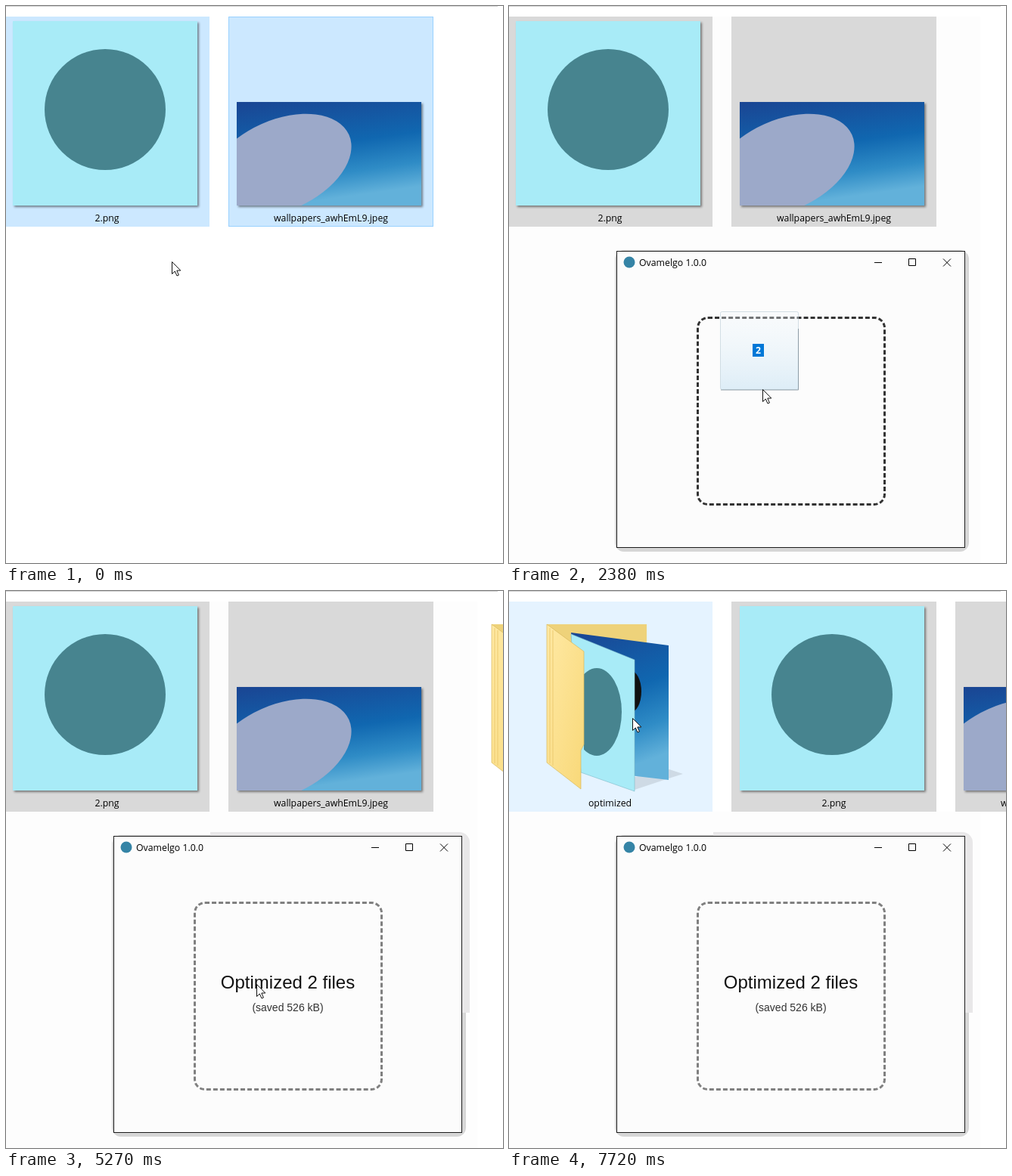
An HTML page that plays this animation: 657 by 737 pixels, repeating every 8000 ms.

```html
<!DOCTYPE html>
<html lang="en">
<head>
<meta charset="utf-8">
<title>Drop to optimize</title>
<style>
  html, body { margin: 0; width: 100%; height: 100%; overflow: hidden; background: #fff; }
  svg { display: block; }
  text { font: 12.3px "Open Sans", "Noto Sans", sans-serif; }
  .label { text-anchor: middle; }
  .result { font-family: "Liberation Sans", Arial, sans-serif; text-anchor: middle; }
  .thumb { filter: drop-shadow(2px 2px 1.5px rgba(0, 0, 0, .45)); }
  #drop { box-sizing: border-box; width: 250px; height: 250px; border: 3px dashed #808080; border-radius: 15px; }
  #drop.hover { border-color: #333; }
</style>
</head>
<body>
<svg width="657" height="737" viewBox="0 0 657 737">
  <defs>
    <linearGradient id="sky" x2=".25" y2="1">
      <stop stop-color="#1a4593"/><stop offset=".5" stop-color="#1067b0"/>
      <stop offset=".78" stop-color="#2f8cc6"/><stop offset="1" stop-color="#62b1da"/>
    </linearGradient>
    <linearGradient id="flap" x2="1" y2="1">
      <stop stop-color="#ffe9a4"/><stop offset="1" stop-color="#f8d878"/>
    </linearGradient>
    <linearGradient id="glass" x2="0" y2="1">
      <stop stop-color="#f2f8fc" stop-opacity=".3"/><stop offset="1" stop-color="#d3e8f5" stop-opacity=".75"/>
    </linearGradient>
    <clipPath id="photoClip"><rect x="11" y="127" width="244" height="137"/></clipPath>
    <clipPath id="pageClip"><path d="M99 64L166 91V265L99 241Z"/></clipPath>
    <clipPath id="corner"><rect x="270" y="310" width="350" height="248"/></clipPath>
  </defs>

  <rect id="tint" width="623" fill="#fdfdfd"/>
  <path d="M0 .5H650" stroke="#d4d4d4"/>

  <g id="png">
    <rect class="tile" y="14" width="271" height="278"/>
    <g class="thumb">
      <rect x="11" y="20" width="244" height="244" fill="#a8ebf7"/>
      <circle cx="133" cy="137" r="80" fill="#47848f"/>
    </g>
    <text class="label" x="135.5" y="285">2.png</text>
  </g>

  <g id="jpeg">
    <rect class="tile" id="focusTile" x=".5" y="14.5" width="270" height="277"/>
    <g class="thumb">
      <g clip-path="url(#photoClip)">
        <rect x="11" y="127" width="244" height="137" fill="url(#sky)"/>
        <ellipse cx="68" cy="211" rx="100" ry="60" transform="rotate(-24 68 211)" fill="#9ca9c9"/>
      </g>
    </g>
    <text class="label" x="135.5" y="285">wallpapers_awhEmL9.jpeg</text>
  </g>

  <g id="folder">
    <rect id="folderHover" y="14" width="271" height="278" fill="#e5f3ff"/>
    <g transform="translate(2)">
      <path d="M50 44H182V228H95Z" fill="#eed27a"/>
      <g id="contents">
        <path d="M166 246L212 236L230 242L205 250L166 263Z" fill="#000" opacity=".1"/>
        <path d="M82 55L211 72V250L100 237Z" fill="url(#sky)"/>
        <ellipse cx="160" cy="133" rx="15" ry="28" fill="#111"/>
        <path d="M82 57L166 91V265L95 240Z" fill="#a8ebf7" stroke="#7fb9c8" stroke-width=".6"/>
        <ellipse cx="116" cy="160" rx="33" ry="58" fill="#47848f" clip-path="url(#pageClip)"/>
      </g>
      <path d="M50 44L99 80V203L95 211V262L50 227Z" fill="url(#flap)" stroke="#d9b85c" stroke-width=".7"/>
      <path d="M54 49V228M58 52V231" stroke="#ecca70" fill="none"/>
    </g>
    <text class="label" x="135.5" y="285">optimized</text>
  </g>

  <g id="app">
    <rect id="shadow" rx="12"/>
    <rect id="cornerShadow" x="136" y="319" width="477" height="409" rx="14" fill="#e8e7e8" clip-path="url(#corner)"/>
    <rect id="frame" x="142.5" y="324.5" width="460" height="392" fill="#fcfcfc"/>
    <circle cx="159" cy="339" r="7.5" fill="#3584a6"/>
    <text id="title" x="172" y="344">Ovamelgo 1.0.0</text>
    <path id="buttons" d="M483 339.5H493M528.5 334.5H537.5V343.5H528.5ZM574 334.5L584 344.5M584 334.5L574 344.5" fill="none"/>
    <foreignObject x="248" y="411" width="250" height="250"><div id="drop"></div></foreignObject>
    <g id="spinner" transform="translate(372 535.5)"></g>
    <g id="result">
      <text class="result" x="372.5" y="526" style="font-size:24px" fill="#111">Optimized 2 files</text>
      <text class="result" x="372.5" y="556" style="font-size:14px" fill="#333">(saved 526 kB)</text>
    </g>
  </g>

  <g id="pointer">
    <g id="ghost">
      <rect x="-55.5" y="-102.5" width="103" height="103" rx="2" fill="url(#glass)" stroke="#b9cbd6" stroke-opacity=".6"/>
      <path d="M-55 1H47.5V-80" fill="none" stroke="#6f818d" stroke-opacity=".7"/>
      <rect x="-13" y="-60" width="15" height="17" fill="#0078d7"/>
      <text class="label" x="-5.5" y="-47" fill="#fff" style="font-weight:bold">2</text>
    </g>
    <path d="M.5 .5V16.5L4.3 13L7 19L9.4 18L6.8 12H11.8Z" fill="#fff" stroke="#111"/>
  </g>
</svg>

<script>
const LOOP = 8000;
const $ = id => document.getElementById(id);
const show = (id, visible) => { $(id).style.display = visible ? '' : 'none'; };
const set = (id, attrs) => { for (const k in attrs) $(id).setAttribute(k, attrs[k]); };

// Pointer positions [time, x, y]; each holds until the next. No position: out of view.
const pointerPath = [
  [0, 219, 338], [120, 205, 450], [265, 171, 659], [410],
  [1110, 130, 690], [1250, 112, 560], [1390, 116, 420], [1530, 165, 265],
  [1670, 230, 235], [1810, 289, 296], [1960, 326, 375], [2100, 345, 440],
  [2240, 350, 490], [2380, 335, 507], [2930, 330, 520], [5000, 331, 520],
  [6960, 322, 490], [7087, 295, 425], [7213, 255, 345], [7340, 220, 280],
  [7467, 192, 225], [7593, 172, 185], [7720, 163, 168]
];

const BARS = 12;
const bars = Array.from({ length: BARS }, (_, i) => {
  const bar = document.createElementNS('http://www.w3.org/2000/svg', 'rect');
  const attrs = { x: 10, y: -2.5, width: 12, height: 5, rx: 2, transform: `rotate(${i * 360 / BARS})` };
  for (const k in attrs) bar.setAttribute(k, attrs[k]);
  return $('spinner').appendChild(bar);
});

function placeTile(id, column) {
  set(id, { transform: `translate(${296 * column - 2})` });
}

function drawFiles(t) {
  const sorted = t >= 5550;
  placeTile('png', sorted ? 1 : 0);
  placeTile('jpeg', sorted ? 2 : 1);
  placeTile('folder', sorted ? 0 : 2);
  show('folder', t >= 5270);
  show('contents', t >= 6140);
  show('folderHover', t >= 7340);
  const selected = t < 810;
  for (const tile of document.querySelectorAll('.tile')) {
    tile.setAttribute('fill', selected ? '#cce8ff' : '#d9d9d9');
  }
  set('focusTile', { stroke: selected ? '#99d1ff' : '#d9d9d9' });
  const top = sorted ? 292 : 14;
  set('tint', { y: top, height: 737 - top });
  show('tint', !selected);
}

function drawSpinner(t) {
  const visible = t >= 3500 && t < 5000;
  show('spinner', visible);
  if (!visible) return;
  const step = Math.floor((t - 3500) / 140);
  const head = Math.floor(step * 140 * BARS / 1000);
  bars.forEach((bar, i) => {
    const age = ((head - i) % BARS + BARS) % BARS;
    bar.setAttribute('opacity', 1 - age * 0.068);
  });
}

function drawApp(t) {
  show('app', t >= 810);
  const inactive = t >= 1530 && t < 2380;
  const ink = inactive ? '#8c8c8c' : '#000';
  set('frame', { stroke: inactive ? '#a0a0a0' : '#1c1c1c' });
  set('title', { fill: ink });
  set('buttons', { stroke: ink });
  if (t < 1530) set('shadow', { x: 136, y: 319, width: 477, height: 409, fill: '#e6e5e6' });
  else if (inactive) set('shadow', { x: 138, y: 320, width: 469, height: 402, fill: '#e6e6e6' });
  else set('shadow', { x: 140, y: 323, width: 468, height: 399, fill: '#d6d6d6' });
  show('cornerShadow', t >= 5000);
  $('drop').className = t >= 2240 && t < 3500 ? 'hover' : '';
  drawSpinner(t);
  show('result', t >= 5000);
}

function drawPointer(t) {
  const [, x, y] = pointerPath.findLast(p => p[0] <= t);
  show('pointer', x !== undefined);
  if (x !== undefined) set('pointer', { transform: `translate(${x} ${y})` });
  show('ghost', t >= 1670 && t < 2930);
  set('ghost', { opacity: t < 2810 ? 1 : 0.5 });
}

function draw(now) {
  const t = now % LOOP;
  drawFiles(t);
  drawApp(t);
  drawPointer(t);
}

const start = performance.now();
function tick() {
  draw(performance.now() - start);
  requestAnimationFrame(tick);
}
tick();
</script>
</body>
</html>
```
